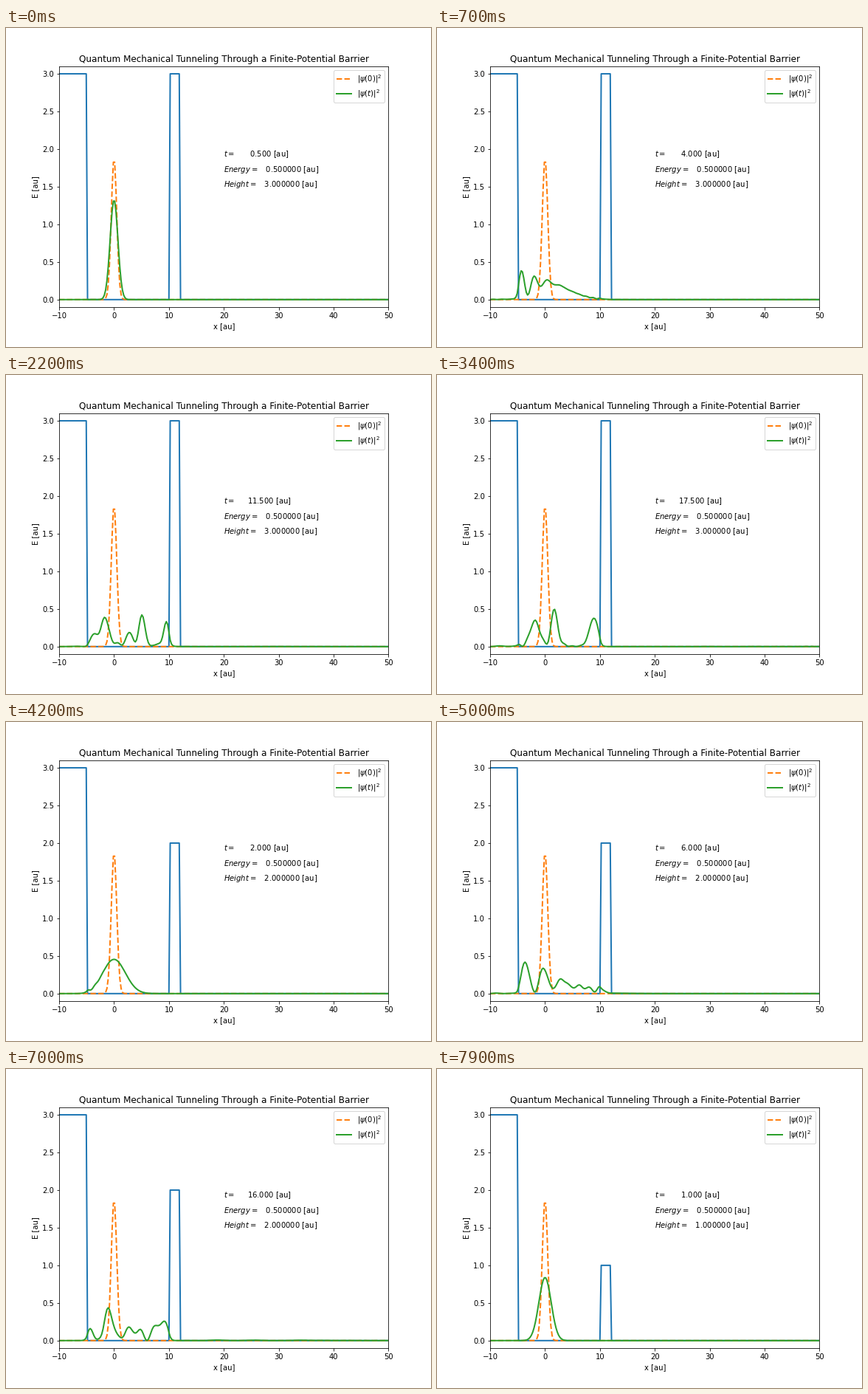
A matplotlib script that plays this animation: 576x432 px, repeating every 8000 ms.

```python
import numpy as np
import matplotlib.pyplot as plt
from matplotlib.animation import FuncAnimation

FRAMES, INTERVAL = 80, 100
STEPS, DT = 39, 0.5            # time steps per barrier height
HEIGHTS = (3.0, 2.0, 1.0)
WALL, ENERGY, SCALE = 3.0, 0.5, 10

x = np.linspace(-10, 50, 256)
dx = x[1] - x[0]

# Kinetic energy on a sinc grid (hbar = m = 1)
n = np.arange(x.size)
gap = n[:, None] - n[None, :]
kinetic = (-1.0) ** gap / np.where(gap == 0, 1, gap) ** 2 / dx**2
np.fill_diagonal(kinetic, np.pi**2 / (6 * dx**2))

psi0 = np.exp(-x**2)
psi0 /= np.linalg.norm(psi0)


def potential(height):
    barrier = (x > 10 + 1e-9) & (x < 12)
    return np.where(x < -5, WALL, np.where(barrier, height, 0.0))


def solve(height):
    v = potential(height)
    levels, states = np.linalg.eigh(kinetic + np.diag(v))
    return v, levels, states, states.T @ psi0


runs = [solve(h) for h in HEIGHTS]

plt.rcParams.update({"font.family": "DejaVu Sans", "font.size": 10})
fig, ax = plt.subplots(figsize=(8, 6), dpi=72)
fig.subplots_adjust(left=0.125, right=0.9, bottom=0.125, top=0.88)
ax.set(xlim=(-10, 50), ylim=(-0.1, 3.1), xlabel="x [au]", ylabel="E [au]",
       title="Quantum Mechanical Tunneling Through a Finite-Potential Barrier")

wall_line, = ax.plot(x, runs[0][0], "C0", lw=2)
ax.plot(x, SCALE * psi0**2, "C1--", lw=2, label=r"$|\psi(0)|^2$")
wave_line, = ax.plot(x, 0 * x, "C2", lw=2, label=r"$|\psi(t)|^2$")
ax.legend(loc="upper right")

time_text = ax.text(20, 1.9, "")
ax.text(20, 1.7, "$Energy=$ %10.6f [au]" % ENERGY)
height_text = ax.text(20, 1.5, "")


def update(frame):
    run, step = divmod(frame, STEPS)
    t = DT * (step + 1)
    v, levels, states, weights = runs[run]
    psi = states @ (weights * np.exp(-1j * levels * t))
    wall_line.set_ydata(v)
    wave_line.set_ydata(SCALE * np.abs(psi) ** 2)
    time_text.set_text("$t=$ %10.3f [au]" % t)
    height_text.set_text("$Height=$ %10.6f [au]" % HEIGHTS[run])
    return wall_line, wave_line, time_text, height_text


anim = FuncAnimation(fig, update, frames=FRAMES, interval=INTERVAL,
                     init_func=lambda: update(0), repeat=True, repeat_delay=0)
plt.show()
```
